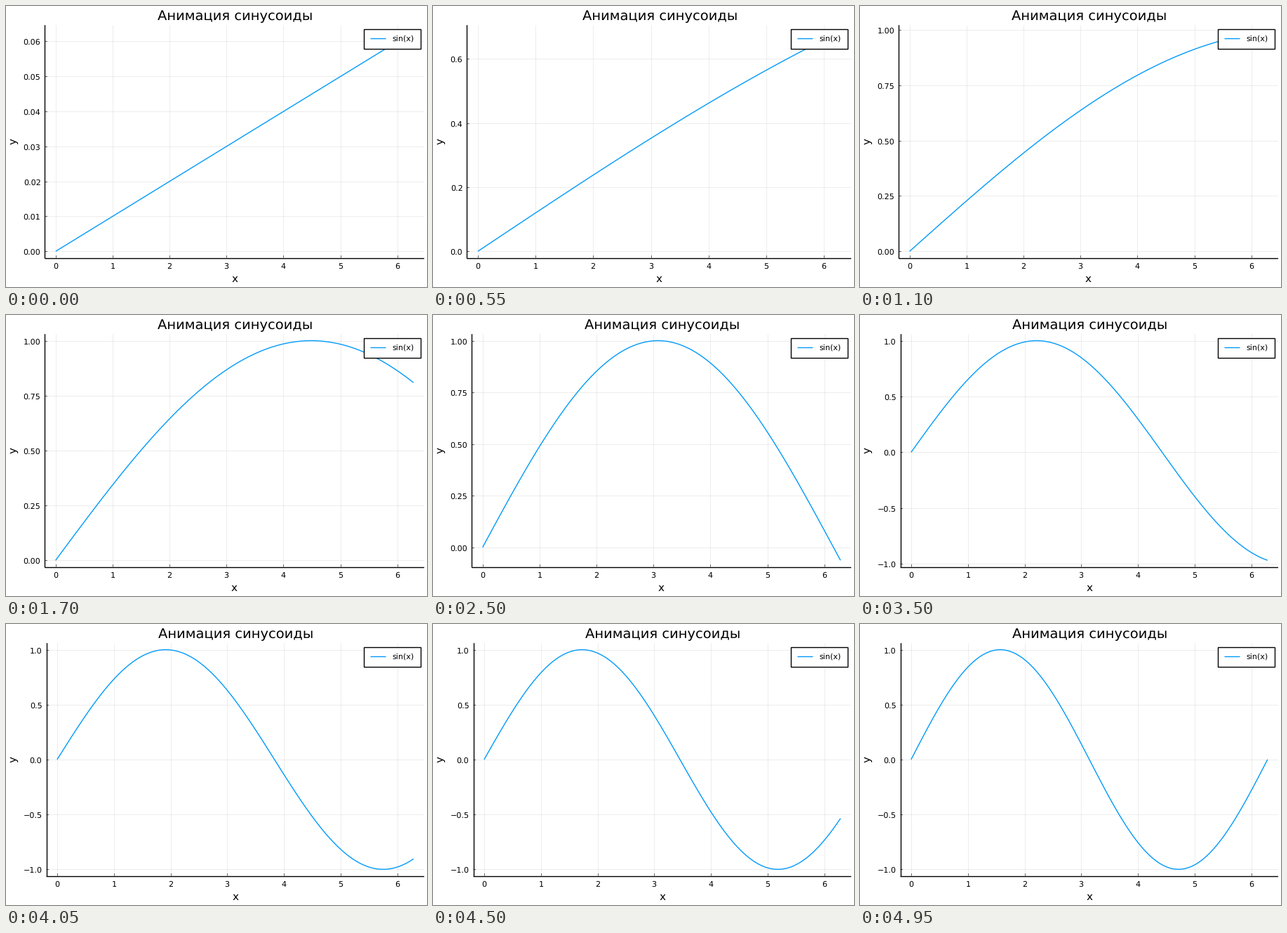
Write a matplotlib script that moves like this. It is 600 px wide and 400 px high and loops after 5 s.

```python
import math

import matplotlib.pyplot as plt
import numpy as np
from matplotlib.animation import FuncAnimation
from matplotlib.patches import Rectangle
from matplotlib.textpath import TextPath

plt.rcParams.update({
    "font.family": "DejaVu Sans",
    "text.hinting": "none",
    "path.snap": False,
    "lines.solid_capstyle": "butt",
})

W, H, DPI = 600, 400, 100
FRAMES = 100
TOP, BOTTOM, RIGHT = 27.2, 358.6, 596.06
PAD = 0.03
TICK_LEN = 3.5
BLUE = "#009AF9"

# Step mantissas and how nice each one is
NICE = {1: 1.0, 5: 0.9, 2: 0.7, 2.5: 0.5, 3: 0.2}
STEPS = sorted(((q * 10.0 ** z, score) for q, score in NICE.items()
                for z in range(-3, 1)), reverse=True)

xs = np.linspace(0, 2 * math.pi, 100)

fig = plt.figure(figsize=(W / DPI, H / DPI), dpi=DPI, facecolor="white")
ax = fig.add_axes([0, 0, 1, 1])


def widen(lo, hi):
    pad = PAD * (hi - lo)
    return lo - pad, hi + pad


def pick_ticks(lo, hi):
    """Choose the tick step by count, coverage and niceness."""
    best, chosen = -math.inf, None
    for step, nice in STEPS:
        first = math.ceil(lo / step - 1e-9)
        last = math.floor(hi / step + 1e-9)
        count = last - first + 1
        if not 4 <= count <= 8:
            continue
        density = 1 - abs(count - 5) / 5
        cover = 1.5 * (hi - lo) / ((count - 1) * step)
        score = density / 4 + cover / 3 + nice / 4
        if score > best + 1e-9:
            best, chosen = score, (step, first, last)
    step, first, last = chosen
    digits = len(f"{step:.6g}".partition(".")[2])
    values = [n * step for n in range(first, last + 1)]
    return values, [f"{v:.{digits}f}".replace("-", "\u2212") for v in values]


def ink(text, size=8):
    """Left and right ink edges in pixels, measured from the text origin."""
    box = TextPath((0, 0), text, size=size * DPI / 72).get_extents()
    return box.x0, box.x1


def crisp(v):
    """Centre of the nearest pixel."""
    return math.floor(v + 0.5) + 0.5


def line(x, y, color="black", lw=1.0, **kw):
    ax.plot(x, y, color=color, lw=lw, **kw)


def hline(x0, x1, y, **kw):
    line([x0, x1], [crisp(y)] * 2, **kw)


def vline(x, y0, y1, **kw):
    line([crisp(x)] * 2, [y0, y1], **kw)


def label(x, y, text, size=8, anchor=0.5, **kw):
    """Text with its origin on a whole pixel; anchor 0 is left, 1 is right."""
    start, end = ink(text, size)
    origin = math.floor(x - anchor * end + 0.5)
    ax.text(origin - start % 1, math.floor(y + 0.5), text, fontsize=size,
            ha="left", va="baseline", color="black", **kw)


def draw_legend():
    ax.add_patch(Rectangle((510.5, 33.5), 81, 28, fc="white", ec="black",
                           lw=1, zorder=5))
    hline(519.5, 541.5, 46, color=BLUE, zorder=6)
    label(551, 50, "sin(x)", anchor=0, zorder=6)


def draw(i):
    ax.clear()
    ax.set_axis_off()
    ax.set_xlim(0, W)
    ax.set_ylim(H, 0)

    ys = np.sin((i + 1) / FRAMES * xs)
    x0, x1 = widen(xs[0], xs[-1])
    y0, y1 = widen(ys.min(), ys.max())
    values, names = pick_ticks(y0, y1)
    left = 31.37 + max(ink(name)[1] for name in names)

    def px(x):
        return left + (x - x0) / (x1 - x0) * (RIGHT - left)

    def py(y):
        return BOTTOM - (y - y0) / (y1 - y0) * (BOTTOM - TOP)

    grid = dict(lw=0.5, alpha=0.1, zorder=1)
    tick = dict(lw=0.7, alpha=0.6, zorder=2)
    for n in range(7):
        x = px(n)
        vline(x, TOP, BOTTOM, **grid)
        vline(x, BOTTOM, BOTTOM - TICK_LEN, **tick)
        label(x, 374, str(n))
    for v, name in zip(values, names):
        y = py(v)
        hline(left, RIGHT, y, **grid)
        hline(left, left + TICK_LEN, y, **tick)
        label(left - 6.3, y + 5, name, anchor=1)

    vline(left, TOP, crisp(BOTTOM), zorder=2)
    hline(left, RIGHT, BOTTOM, zorder=2)
    line(px(xs), py(ys), BLUE, zorder=3)

    middle = (left + RIGHT) / 2
    label(middle, 20, "Анимация синусоиды", 14)
    label(middle, 393, "x", 11)
    ax.text(10.7, (TOP + BOTTOM) / 2, "y", fontsize=11, ha="center",
            va="center", rotation=90)
    draw_legend()
    return []


anim = FuncAnimation(fig, draw, frames=FRAMES, init_func=lambda: draw(0),
                     interval=50, repeat=True, repeat_delay=0)
plt.show()
```
